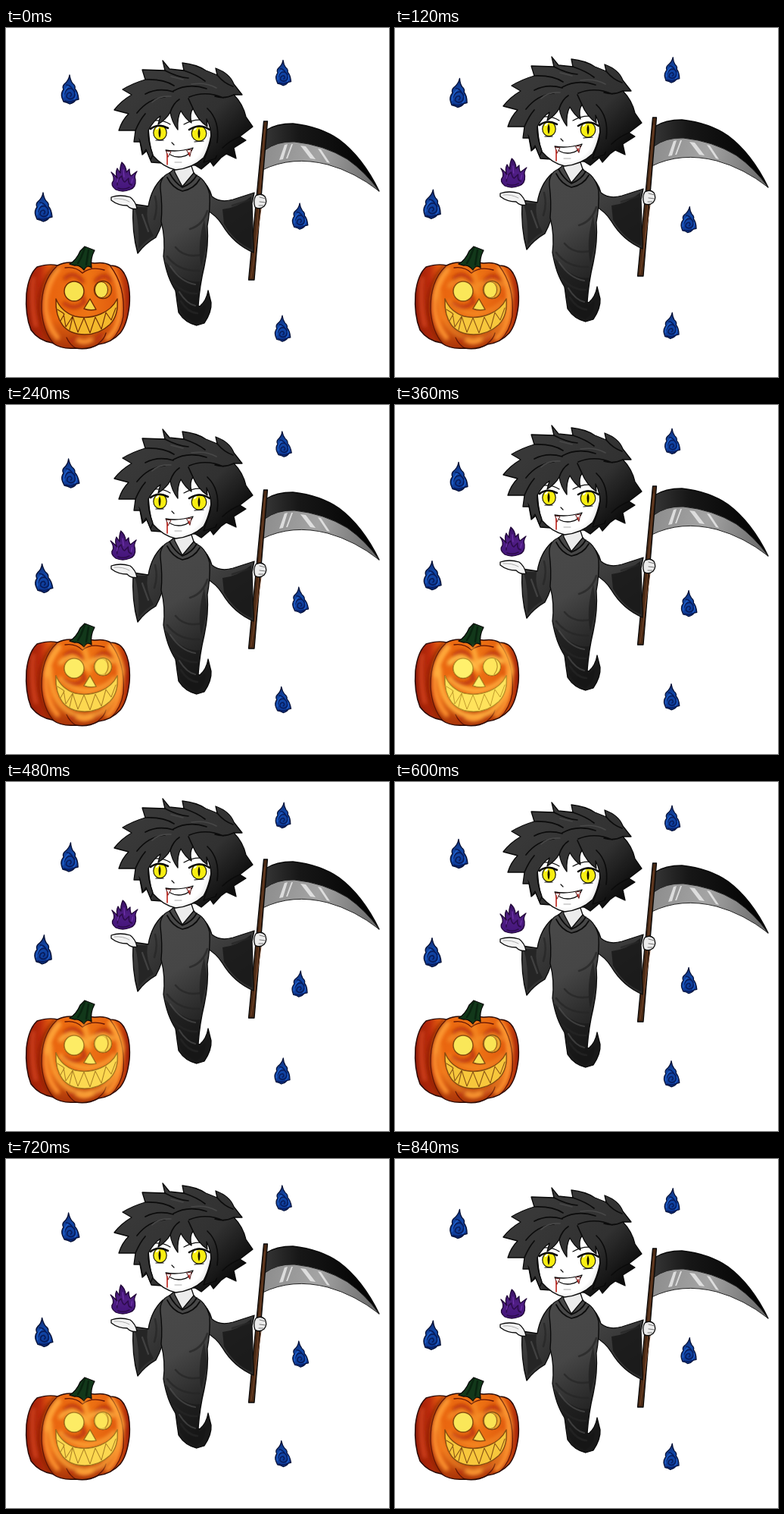
Recreate the animation shown at these times as an HTML page. Size 506 by 460 pixels, loop 0.96 s.

```html
<!DOCTYPE html>
<html lang="en">
<head>
<meta charset="utf-8">
<title>Halloween reaper</title>
<style>
html, body { margin: 0; width: 100%; height: 100%; overflow: hidden; background: #fff; }
svg { display: block; width: 100vw; height: 100vh; }
path, ellipse, circle { stroke-linejoin: round; stroke-linecap: round; }
.ink { stroke: #080808; stroke-width: 1.3; }
.line { fill: none; stroke: #0b0b0b; stroke-width: 1.7; }
.fold { fill: none; stroke: #262626; stroke-width: 2.6; opacity: .7; }
.shine { fill: none; stroke: #585858; stroke-width: 2.2; opacity: .55; }
</style>
</head>
<body>
<svg viewBox="0 0 506 460">
<defs>
  <linearGradient id="hair" gradientUnits="userSpaceOnUse" x1="200" y1="60" x2="300" y2="165">
    <stop offset="0" stop-color="#383838"/><stop offset=".6" stop-color="#313131"/><stop offset="1" stop-color="#0c0c0c"/>
  </linearGradient>
  <linearGradient id="robe" x1="0" y1="0" x2=".2" y2="1">
    <stop offset="0" stop-color="#494949"/><stop offset=".45" stop-color="#464646"/><stop offset=".75" stop-color="#2c2c2c"/><stop offset="1" stop-color="#191919"/>
  </linearGradient>
  <linearGradient id="sleeve" x1="0" y1="0" x2=".5" y2="1">
    <stop offset="0" stop-color="#4a4a4a"/><stop offset="1" stop-color="#2c2c2c"/>
  </linearGradient>
  <linearGradient id="steel" x1="0" y1="0" x2="1" y2=".1">
    <stop offset="0" stop-color="#8c8c8c"/><stop offset=".5" stop-color="#a4a4a4"/><stop offset="1" stop-color="#6e6e6e"/>
  </linearGradient>
  <linearGradient id="edge" x1="0" y1="0" x2="1" y2="0">
    <stop offset="0" stop-color="#353535"/><stop offset=".3" stop-color="#171717"/><stop offset="1" stop-color="#000"/>
  </linearGradient>
  <radialGradient id="skin" cx=".45" cy=".5" r=".62">
    <stop offset=".7" stop-color="#fff"/><stop offset="1" stop-color="#cfcfcf"/>
  </radialGradient>
  <linearGradient id="blue" x1="0" y1="0" x2=".3" y2="1">
    <stop offset="0" stop-color="#10225e"/><stop offset=".5" stop-color="#1248a8"/><stop offset="1" stop-color="#0d3894"/>
  </linearGradient>
  <linearGradient id="purple" x1="0" y1="0" x2="0" y2="1">
    <stop offset="0" stop-color="#381063"/><stop offset=".5" stop-color="#4f1e84"/><stop offset="1" stop-color="#43147a"/>
  </linearGradient>
  <linearGradient id="rind" x1="0" y1="0" x2="1" y2="0">
    <stop offset="0" stop-color="#8f1a08"/><stop offset=".14" stop-color="#bd2c0c"/><stop offset=".24" stop-color="#e9640f"/>
    <stop offset=".6" stop-color="#ee7414"/><stop offset=".88" stop-color="#e05a0e"/><stop offset="1" stop-color="#a0200a"/>
  </linearGradient>
  <linearGradient id="under" x1="0" y1="0" x2="0" y2="1">
    <stop offset=".65" stop-color="#8a1c06" stop-opacity="0"/><stop offset="1" stop-color="#8a1c06" stop-opacity=".7"/>
  </linearGradient>
  <filter id="soft" x="-30%" y="-30%" width="160%" height="160%"><feGaussianBlur stdDeviation="2.6"/></filter>
  <path id="shell" d="M41 315Q57 310 68 313Q82 306 96 311Q106 308 117 310Q130 308 138 313Q151 313 157 325Q165 340 163 366Q160 391 151 402Q139 415 122 417Q108 425 92 422Q74 424 61 415Q43 412 33 398Q25 378 27 350Q30 325 41 315Z"/>
  <clipPath id="inside"><use href="#shell"/></clipPath>
  <path id="grin" d="M66 357Q73 374 91 380Q108 384 125 377Q140 371 147 357Q149 379 137 391Q123 404 104 404Q85 404 75 392Q65 379 66 357Z"/>
  <path id="teeth" d="M68 371L76 376L79 394L88 380L95 401L103 382L111 402L118 381L126 397L132 375L139 385L145 369M72 386L77 377M84 398L88 381"/>
  <path id="nose" d="M111 357L103 370Q111 373 119 371Z"/>
  <g id="flame">
    <path d="M0-20Q-1-13-7-8Q-10-5-8-1Q-12 4-10 10L-8 15Q-3 16 0 18Q5 17 8 13L12 12Q11 2 7-2Q8-6 4-9Q1-13 0-20Z" fill="url(#blue)" stroke="#071238" stroke-width="1.4"/>
    <path d="M-7 5Q-4-4 3-2Q9 2 6 9Q1 14-4 9Q-4 3 1 3Q4 6 1 8M-4-7Q1-7 4-1M7 13Q2 17-6 14" fill="none" stroke="#071c5c" stroke-width="1.7"/>
    <path d="M-8 9Q-8 0-2-5M8 3Q10 9 6 12" fill="none" stroke="#2463cc" stroke-width="1.3"/>
  </g>
</defs>

<g id="wisps"></g>

<g id="pumpkin">
  <use href="#shell" fill="url(#rind)"/>
  <g clip-path="url(#inside)">
    <use href="#shell" fill="url(#under)"/>
    <g fill="none" filter="url(#soft)">
      <path d="M66 314Q43 336 44 375Q48 402 62 416" stroke="#8f1c06" stroke-width="5"/>
      <path d="M78 330Q90 319 101 334M119 333Q130 321 138 332M77 363Q90 372 100 364M98 347L104 362M84 414L94 408M118 412L126 404" stroke="#b8330a" stroke-width="5"/>
      <path d="M69 318Q50 342 53 374Q56 394 68 408M138 317Q154 340 150 378Q147 398 134 409M96 412Q104 416 112 411" stroke="#ff9630" stroke-width="6"/>
      <path d="M36 330Q32 360 39 392" stroke="#d2431a" stroke-width="5"/>
    </g>
    <path d="M67 314Q46 334 47 372Q49 400 63 416M138 314Q158 340 155 380Q152 399 139 412M78 316Q92 314 101 323Q112 314 130 319M92 422Q84 417 80 408M122 416Q130 410 132 402" fill="none" stroke="#611405" stroke-width="1.3"/>
  </g>
  <use href="#shell" fill="none" stroke="#2a0a05" stroke-width="1.5"/>
  <path d="M84 311Q93 306 98 294L104 288L117 293Q111 304 113 316Q107 311 103 319Q97 312 91 313Z" fill="#12381a" class="ink"/>
  <path d="M104 290L99 303L95 310M109 293L106 312" fill="none" stroke="#0a2410" stroke-width="2.5"/>
  <g stroke="#6b2a06" stroke-width="1.4">
    <circle cx="90" cy="347" r="13" fill="#f8e350"/>
    <circle cx="128" cy="345" r="11.5" fill="#e58b1c"/>
    <ellipse cx="126" cy="345" rx="8.5" ry="10.5" fill="#f8e350" stroke-width="1"/>
    <use href="#nose" fill="#f8d848"/>
    <use href="#grin" fill="#f4b92c"/>
    <use href="#teeth" fill="none" stroke-width="1.1"/>
  </g>
  <g id="glow">
    <g clip-path="url(#inside)">
      <g fill="none" stroke="#ffae3c" filter="url(#soft)">
        <path d="M58 348Q60 405 104 411Q148 407 153 348" stroke-width="7"/>
        <path d="M72 361Q84 374 106 377Q132 374 143 360" stroke-width="6"/>
        <path d="M72 340Q88 322 106 346Q118 326 142 338" stroke-width="6" stroke="#ffc34d"/>
        <path d="M104 322L110 350M70 320Q54 340 54 356M138 318Q153 335 154 352" stroke-width="6"/>
      </g>
    </g>
    <g stroke="#b99328" stroke-width="1.2">
      <circle cx="90" cy="347" r="13" fill="#fff06c"/>
      <circle cx="128" cy="345" r="11.5" fill="#ffe65c"/>
      <path d="M132 335Q139 345 131 355" fill="none"/>
      <use href="#nose" fill="#fff06c"/>
      <use href="#grin" fill="#ffe35c"/>
      <use href="#teeth" fill="none" stroke-width=".9"/>
    </g>
  </g>
</g>

<g id="reaper">
  <path fill="url(#hair)" class="ink" d="M207 43L216 54L235 56L233 46Q252 48 264 56L279 62L277 53Q296 60 301 74L312 88L301 88Q313 100 317 117L326 130L309 143L317 148L301 158L304 172L291 166L284 171L274 182L270 176L258 186L250 181L192 177L186 162L180 167L177 150L169 150L171 135L149 135Q153 122 162 113L143 108Q151 97 166 88L154 81Q167 73 184 68L180 55L210 56Z"/>

  <!-- scythe -->
  <path d="M343 135Q357 126 379 126Q415 130 440 147Q471 170 493 215Q459 178 417 164Q373 153 342 161Z" fill="url(#edge)" class="ink"/>
  <path d="M342 161Q358 149 381 150Q420 154 451 173Q475 190 493 215Q461 190 425 180Q378 168 339 187Z" fill="url(#steel)" stroke="#222" stroke-width="1"/>
  <path d="M361 174L368 154L372 153L366 173ZM370 172L377 153L379 153L372 172ZM389 155L396 156L409 173L402 172ZM412 159L416 160L428 178L424 177Z" fill="#eee" opacity=".8"/>
  <path d="M340.5 123L345.5 123L328 332L320.5 332Z" fill="#4a2a15" class="ink"/>
  <path d="M342 133L329 295M337 238L324 329" fill="none" stroke="#74452a" stroke-width="1"/>

  <!-- robe -->
  <path fill="url(#sleeve)" class="ink" d="M207 197Q192 211 188 235L168 232Q166 269 174 297Q184 284 198 276Q208 258 213 230Z"/>
  <path d="M170 236Q177 260 175 291Q185 279 195 274Q184 255 187 236Z" fill="#252525"/>
  <path fill="url(#sleeve)" class="ink" d="M256 198Q268 207 272 222Q283 231 300 226L328 217L325 231L327 296Q301 285 286 260Q278 247 265 240Z"/>
  <path d="M286 239Q306 237 324 222L325 292Q302 282 288 258Z" fill="#171717" opacity=".8"/>
  <path fill="url(#robe)" class="ink" d="M216 191Q203 196 204 212Q207 235 205 255Q211 278 208 301Q213 330 224 346Q226 362 228 375Q237 389 252 392L262 389Q272 374 271 362L267 346Q265 359 256 367L254 366Q256 339 262 314Q268 286 266 261Q270 240 269 219Q264 199 251 194Q247 190 243 185L222 186Z"/>
  <path d="M211 308Q235 338 257 334Q252 352 255 371L263 365Q265 380 251 389Q237 382 230 371Q227 351 214 327ZM262 252Q252 285 258 314L266 282Z" fill="#141414" opacity=".5"/>
  <path class="fold" d="M224 289Q237 305 262 298M213 301Q228 321 255 320M221 336Q236 351 252 350M231 360Q240 375 253 376M243 265Q260 260 266 241M197 222Q201 237 196 252M299 234L321 227"/>
  <path class="shine" d="M217 314Q231 335 250 338M229 348Q239 364 250 366M180 246L188 268"/>
  <path d="M221 178L223 190L233 209L248 191L243 176Z" fill="#ececec" class="ink"/>
  <path class="line" d="M216 191Q223 204 233 210Q246 205 252 194M213 197Q220 211 233 215Q249 212 256 199"/>

  <!-- hands -->
  <path d="M139 223Q151 219 164 223Q171 228 173 238Q166 240 160 234Q148 234 139 227Z" fill="#f3f3f3" class="ink"/>
  <path d="M143 225Q154 224 163 229" fill="none" stroke="#aaa"/>
  <path d="M330 221Q337 217 342 222Q346 229 341 235Q335 240 329 236Q326 228 330 221Z" fill="#ececec" class="ink"/>
  <path d="M335 223L343 225M335 229L343 230M334 234L340 234" fill="none" stroke="#777"/>

  <!-- face -->
  <path d="M188 122Q188 151 194 168Q207 183 224 187Q246 185 261 171Q271 153 273 123L248 95L215 99Z" fill="url(#skin)" class="ink"/>
  <g stroke="#171700" stroke-width="1.2" fill="#f8ee12">
    <ellipse cx="203.5" cy="138" rx="8.7" ry="9.7"/>
    <ellipse cx="255" cy="139" rx="9.8" ry="10"/>
  </g>
  <path d="M203 131Q200 138 203 145Q206 138 203 131ZM255 132Q252 139 255 146Q258 139 255 132Z" fill="#151000"/>
  <path d="M199 133l2-2M249 134l2-2" stroke="#fff" stroke-width="2"/>
  <path d="M191 133Q201 125 214 132M242 134Q256 125 269 134" fill="none" stroke="#080808" stroke-width="2.6"/>
  <path class="line" d="M198 148L208 148M249 150L261 149M196 122Q208 121 217 127M235 127Q250 119 261 122M219 151L222 154" style="stroke-width:1.2"/>
  <path d="M211 161Q228 164 247 158Q242 170 228 170Q217 170 211 161Z" fill="#fff" class="ink"/>
  <path d="M212 162L218 163L214 170ZM239 161L245 160L243 169Z" fill="#fff" stroke="#511" stroke-width="1"/>
  <path d="M213 166V180M242 164V167" fill="none" stroke="#bd2018" stroke-width="1.6"/>
  <path d="M223 177H232" stroke="#aaa"/>

  <!-- fringe -->
  <path fill="url(#hair)" stroke="#080808" stroke-width="1.3" d="M174 102L176 145L181 166L185 160L191 174L194 167Q187 148 188 135Q195 122 204 116L201 127Q212 120 217 111Q219 124 227 134Q226 118 231 109Q237 120 245 125Q242 113 247 106Q253 121 266 130L265 120Q273 134 270 151L261 177L277 172L293 120L277 87L232 73L190 82Z"/>
  <path d="M171 100L190 79L235 68L281 81L300 116L286 162L274 171L272 115L230 94L204 110L187 126L179 150L172 140Z" fill="url(#hair)"/>
  <path class="line" d="M210 56Q227 65 241 66M184 68Q208 67 222 76M184 87Q201 78 221 84M173 112Q188 93 210 91M171 135Q177 121 184 113M235 56Q253 62 263 70M221 83Q241 72 265 80M242 91Q264 82 287 92M279 62Q288 73 300 77M266 106Q283 122 279 151M301 88Q289 94 276 90M309 143Q295 149 286 158M217 111Q221 99 229 94M247 106L241 93"/>
  <path d="M193 98Q202 89 218 90M245 74Q264 71 278 79M218 64L234 68" fill="none" stroke="#484848" stroke-width="1.6"/>

  <g id="ember">
    <path d="M139 190Q145 195 147 198Q144 191 147 185Q150 190 151 191Q150 184 153 177Q159 182 159 190L163 186Q163 192 165 195L173 189Q169 195 171 200Q172 210 164 213Q154 217 145 213Q137 207 142 201Q143 196 139 190Z" fill="url(#purple)" stroke="#210638" stroke-width="1.3"/>
    <path d="M147 207Q147 199 153 195Q154 202 157 203L162 198Q161 206 166 207M148 211Q156 214 163 210" fill="none" stroke="#2d0c4b" stroke-width="1.6"/>
    <path d="M155 187L156 196M147 203L148 199M167 199L166 204" fill="none" stroke="#7034ab" stroke-width="1.3"/>
  </g>
</g>
</svg>
<script>
const STEP = 120, COUNT = 8;
const GLOW = [0, .35, .75, 1, .75, .35, .75, .35];
const $ = id => document.getElementById(id);

// x, y, scale, drift direction
const wisps = [[84, 82, 1, 1], [366, 60, .88, -1], [49, 237, 1, -1], [388, 249, .9, 1], [365, 397, .9, -1]]
  .map(([x, y, size, dir]) => {
    const node = document.createElementNS('http://www.w3.org/2000/svg', 'use');
    node.setAttribute('href', '#flame');
    $('wisps').append(node);
    return { node, x, y, size, dir };
  });

function draw(time) {
  const i = Math.floor(time / STEP) % COUNT;
  const rise = 4 - Math.abs(4 - i);
  $('reaper').setAttribute('transform', `translate(0 ${-Math.round(rise * 5.3)})`);
  const lean = [0, -2, 2, 0, -2][rise];
  $('ember').setAttribute('transform', `translate(155 215) skewX(${lean}) translate(-155 -215)`);
  for (const { node, x, y, size, dir } of wisps) {
    const drift = dir * rise * (dir > 0 ? 4.5 : 3.8);
    node.setAttribute('transform', `translate(${x} ${y + drift}) scale(${size}) skewX(${lean * 2})`);
  }
  $('glow').setAttribute('opacity', GLOW[i]);
}

const start = performance.now();
function tick() {
  draw(performance.now() - start);
  requestAnimationFrame(tick);
}
tick();
</script>
</body>
</html>
```
